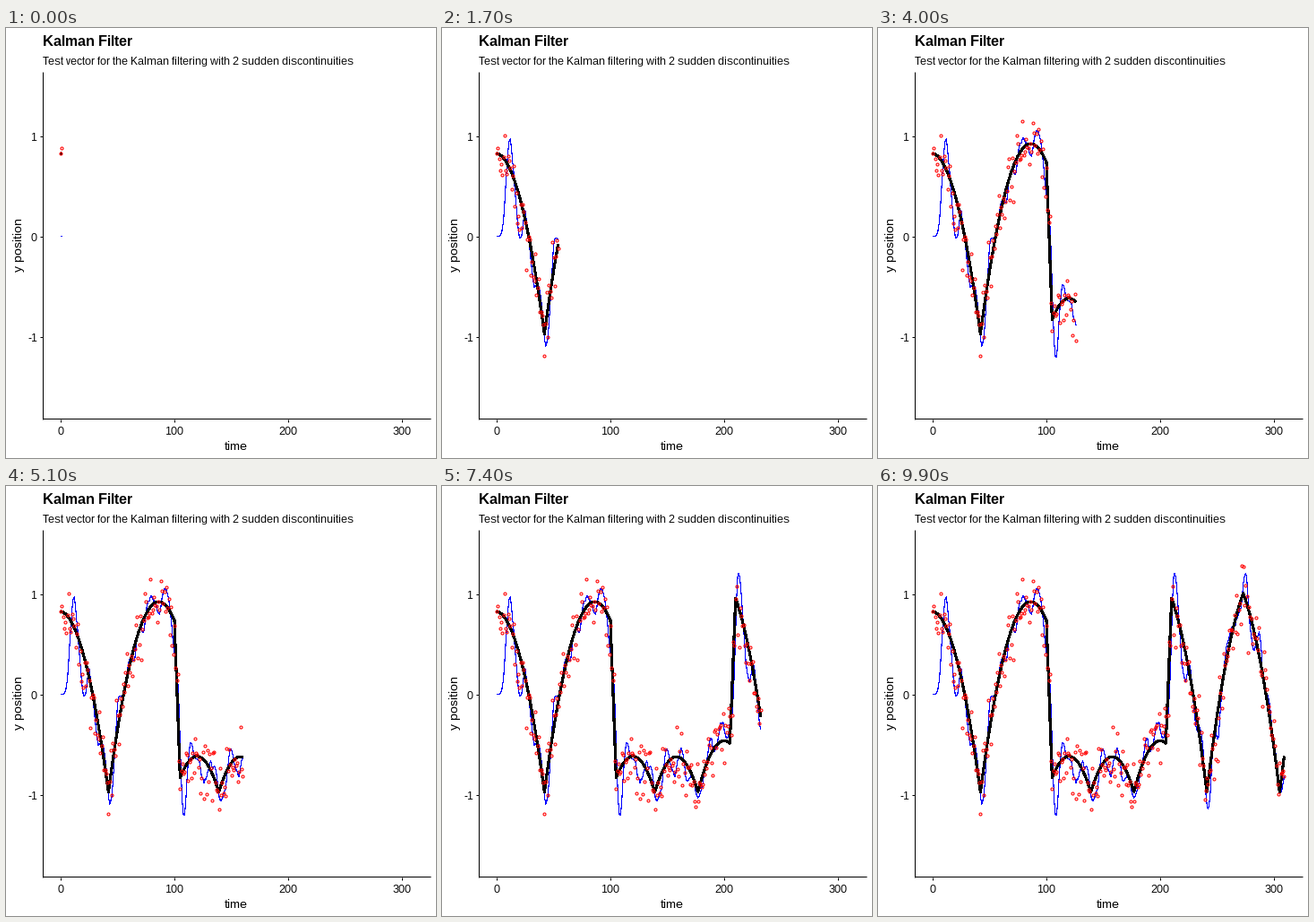
These frames come from a looping animation (480 px wide and 480 px high, 10 s). A matplotlib script:

```python
import numpy as np
import matplotlib
import matplotlib.pyplot as plt
from matplotlib.animation import FuncAnimation

SIZE, DPI = 480, 72
FRAMES, LAST = 100, 309
GRAVITY = 0.00097
NOISE = 0.18
ALPHA, BETA, WARMUP = 0.22, 0.22, 9

matplotlib.rcParams.update({
    "font.family": "Liberation Sans",
    "text.hinting": "native",
    "text.hinting_factor": 1,
    "axes.unicode_minus": False,
})

# Bounces of the true path; straight jumps start at the JUMPS times
KNOTS = [(0, .83), (42, -.97), (100, .74), (105, -.83), (139, -.97),
         (177, -.97), (205, -.485), (210, .96), (241, -.97),
         (273, 1.01), (305, -.97), (338, 1.01)]
JUMPS = (100, 205)


def true_path(time):
    y = np.interp(time, *zip(*KNOTS))
    for (a, _), (b, _) in zip(KNOTS, KNOTS[1:]):
        if a not in JUMPS:
            inside = (time >= a) & (time < b)
            y = y + inside * GRAVITY * (time - a) * (b - time)
    return y


def track(samples):
    """Position and velocity filter whose gain grows from zero."""
    pos = vel = 0.0
    out = []
    for k, z in enumerate(samples):
        gain = min(1, (k / WARMUP) ** 3)
        pos += vel
        residual = z - pos
        pos += ALPHA * gain * residual
        vel += BETA * gain * residual
        out.append(pos)
    return np.array(out)


def px(time):
    return 61 + 1.27 * time


def py(value):
    return 232.8 - 112 * value


rng = np.random.default_rng(7)
t = np.arange(LAST + 1)
truth = true_path(t)
measured = truth + np.clip(rng.normal(0, NOISE, t.size), -.45, .45)
estimate = track(measured)

fig = plt.figure(figsize=(SIZE / DPI, SIZE / DPI), dpi=DPI, facecolor="white")
ax = fig.add_axes([0, 0, 1, 1])
ax.set(xlim=(0, SIZE), ylim=(SIZE, 0))
ax.axis("off")


def rule(xs, ys):
    ax.plot(xs, ys, color="black", lw=1, snap=True, solid_capstyle="butt")


def label(x, y, text, size, ha="center", **kw):
    ax.text(x, y, text, fontsize=size, ha=ha, va="baseline", color="black",
            rotation_mode="anchor", **kw)


rule([41, 41], [49, 437])
rule([41, 474], [436, 436])
for v in (-1, 0, 1):
    y = 233 - 112 * v
    rule([38, 41], [y, y])
    label(35, y + 5, str(v), 12, ha="right")
for v in (0, 100, 200, 300):
    x = round(px(v))
    rule([x, x], [437, 440])
    label(x, 454, str(v), 12)

label(41, 20, "Kalman Filter", 16, ha="left", weight="bold")
label(41, 41, "Test vector for the Kalman filtering with 2 sudden discontinuities",
      12, ha="left")
label(257, 471, "time", 14)
label(18, 242, "y position", 14, rotation=90)

# Aliased strokes fill every touched pixel, so they are drawn slightly thin
stroke = dict(antialiased=False, solid_capstyle="butt",
              solid_joinstyle="round")
blue, = ax.plot([], [], color="#0000ff", lw=.1, **stroke)
black, = ax.plot([], [], color="black", lw=2.1, **stroke)
red, = ax.plot([], [], "o", ms=3, mew=1.1, mfc="none", mec="#ff0000")
SERIES = ((blue, estimate), (black, truth), (red, measured))


def update(i):
    n = min(round(1 + 3.12 * i), LAST) + 1
    for artist, values in SERIES:
        artist.set_data(px(t[:n]), py(values[:n]))
    return blue, black, red


anim = FuncAnimation(fig, update, frames=FRAMES, interval=100, repeat=True,
                     repeat_delay=0, blit=False)
plt.show()
```
